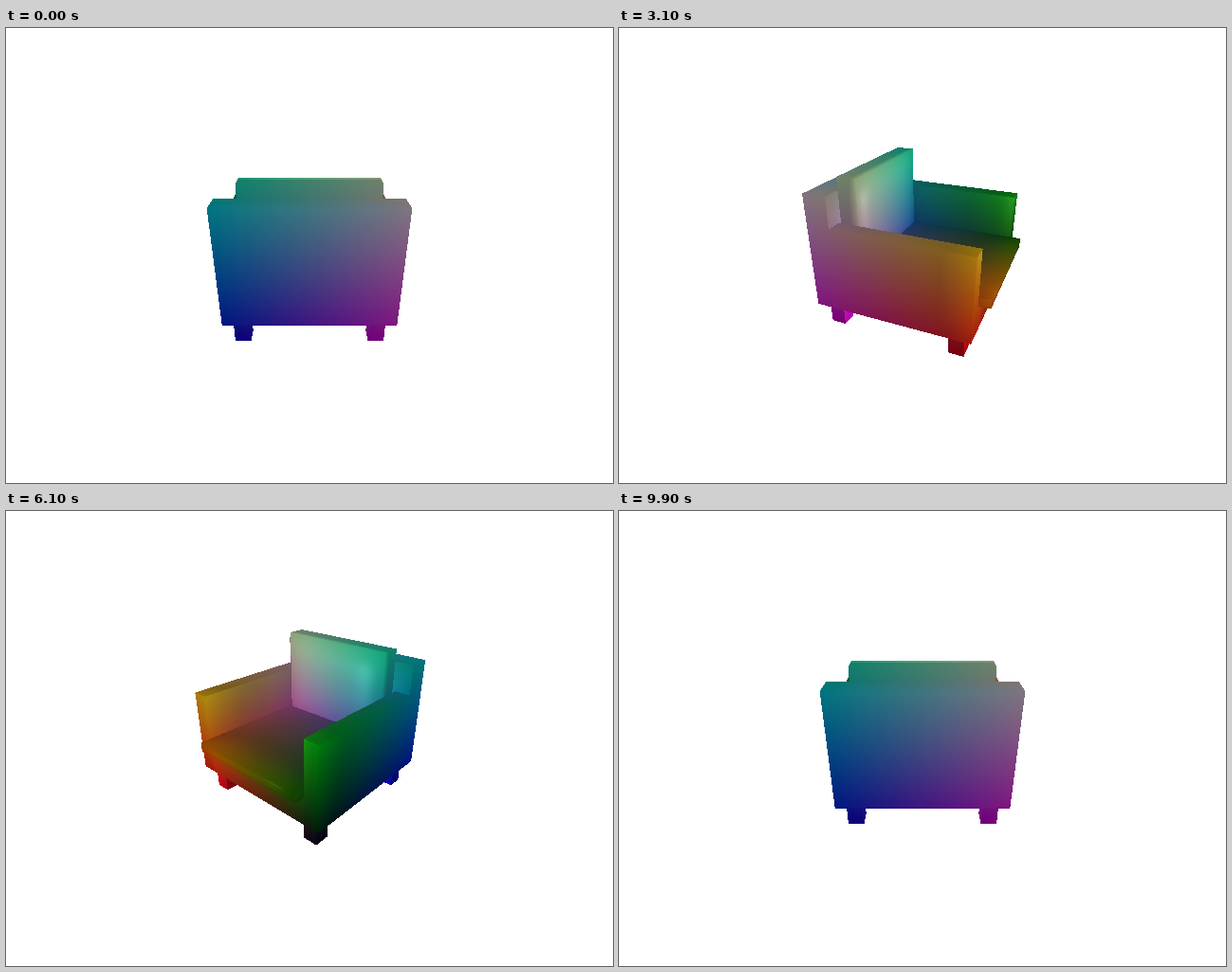
These frames come from a looping animation (640 px wide and 480 px high, 10000 ms). An HTML page with a canvas:

```html
<!DOCTYPE html>
<html lang="en">
<head>
<meta charset="utf-8">
<title>Rotating armchair</title>
<style>
html, body { margin: 0; width: 100%; height: 100%; overflow: hidden; background: #fff; }
canvas { display: block; }
</style>
</head>
<body>
<canvas id="stage" width="640" height="480"></canvas>
<script>
const ctx = document.getElementById('stage').getContext('2d');
const STEPS = 100, STEP_MS = 100;
const FOCAL = 415.7, DISTANCE = 5.19, ELEVATION = 28 * Math.PI / 180;
const VIEW = { x: 184, y: 118, w: 274, h: 242 };
const LIGHT = [0, 0, -DISTANCE];
const COLOR_MIN = [-1, -0.69, -1.12], COLOR_MAX = [1, 1.19, 0.98];

const boxes = [];

// Normals lean outward towards the edges of the frame, which softens the shading.
function addBox(lo, hi, bend, frameLo = lo, frameHi = hi) {
  boxes.push({
    lo, hi, bend,
    mid: lo.map((_, i) => (frameLo[i] + frameHi[i]) / 2),
    half: lo.map((_, i) => (frameHi[i] - frameLo[i]) / 2)
  });
}

const BODY = [[-1, -0.388, -0.98], [1, 1.04, 0.98]];
addBox([-1, -0.388, 0.69], [1, 1.04, 0.98], 2, ...BODY);
addBox([-1, -0.388, -0.98], [-0.8, 0.67, 0.69], 0.9, ...BODY);
addBox([0.8, -0.388, -0.98], [1, 0.67, 0.69], 0.9, ...BODY);
addBox([-0.8, -0.388, -0.98], [0.8, 0, 0.69], 0.3, ...BODY);
addBox([-0.8, -0.02, -1.12], [0.8, 0.1, 0.5], 1.2);
addBox([-0.76, 0, 0.46], [0.76, 1.19, 0.69], 0.9, [-0.76, 0, 0.46], [0.76, 1.19, 0.9]);
for (const x of [-0.89, 0.7])
  for (const z of [-0.88, 0.69])
    addBox([x, -0.69, z], [x + 0.19, -0.388, z + 0.19], 0);

const dot = (a, b) => a[0] * b[0] + a[1] * b[1] + a[2] * b[2];

function unit(v) {
  const len = Math.hypot(v[0], v[1], v[2]);
  return [v[0] / len, v[1] / len, v[2] / len];
}

function shade(point, box, axis, side, ray) {
  const normal = [0, 0, 0];
  for (let i = 0; i < 3; i++) {
    const u = (point[i] - box.mid[i]) / box.half[i];
    normal[i] = i === axis ? side : box.bend * u * u * u;
  }
  const n = unit(normal);
  const toLight = unit([LIGHT[0] - point[0], LIGHT[1] - point[1], LIGHT[2] - point[2]]);
  const cos = dot(n, toLight);
  let gloss = 0;
  if (cos > 0) {
    const mirror = n.map((c, i) => 2 * cos * c - toLight[i]);
    gloss = 0.08 * Math.pow(Math.max(0, -dot(mirror, unit(ray))), 10);
  }
  const light = 0.5 + 0.3 * Math.max(0, cos);
  return point.map((p, i) =>
    255 * ((p - COLOR_MIN[i]) / (COLOR_MAX[i] - COLOR_MIN[i]) * light + gloss));
}

function trace(eye, ray) {
  let nearest = Infinity, hit = null, hitAxis = 0;
  for (const box of boxes) {
    let enter = -Infinity, leave = Infinity, axis = 0;
    for (let i = 0; i < 3; i++) {
      const a = (box.lo[i] - eye[i]) / ray[i];
      const b = (box.hi[i] - eye[i]) / ray[i];
      const near = a < b ? a : b, far = a < b ? b : a;
      if (near > enter) { enter = near; axis = i; }
      if (far < leave) leave = far;
    }
    if (enter < leave && enter < nearest) {
      nearest = enter;
      hit = box;
      hitAxis = axis;
    }
  }
  if (!hit) return null;
  const point = eye.map((e, i) => e + nearest * ray[i]);
  return shade(point, hit, hitAxis, ray[hitAxis] < 0 ? 1 : -1, ray);
}

const picture = ctx.createImageData(VIEW.w, VIEW.h);

function draw(step) {
  // The last step closes the full turn; the tiny offset avoids axis-parallel rays.
  const turn = step / (STEPS - 1) * 2 * Math.PI + 1e-6;
  const s = Math.sin(turn), c = Math.cos(turn);
  const se = Math.sin(ELEVATION), ce = Math.cos(ELEVATION);
  const back = [s * ce, se, c * ce];
  const right = [c, 0, -s];
  const up = [-s * se, ce, -c * se];
  const eye = back.map(v => v * DISTANCE);
  const data = picture.data;
  data.fill(255);
  for (let y = 0, k = 0; y < VIEW.h; y++) {
    const dy = 239.5 - VIEW.y - y;
    for (let x = 0; x < VIEW.w; x++, k += 4) {
      const dx = VIEW.x + x - 319.5;
      const ray = [
        right[0] * dx + up[0] * dy - back[0] * FOCAL,
        up[1] * dy - back[1] * FOCAL,
        right[2] * dx + up[2] * dy - back[2] * FOCAL
      ];
      const color = trace(eye, ray);
      if (color) {
        data[k] = color[0];
        data[k + 1] = color[1];
        data[k + 2] = color[2];
      }
    }
  }
  ctx.fillStyle = '#fff';
  ctx.fillRect(0, 0, 640, 480);
  ctx.putImageData(picture, VIEW.x, VIEW.y);
}

const start = performance.now();
let shown = -1;

function tick() {
  const step = Math.floor((performance.now() - start) / STEP_MS) % STEPS;
  if (step !== shown) draw(shown = step);
  requestAnimationFrame(tick);
}
tick();
</script>
</body>
</html>
```
